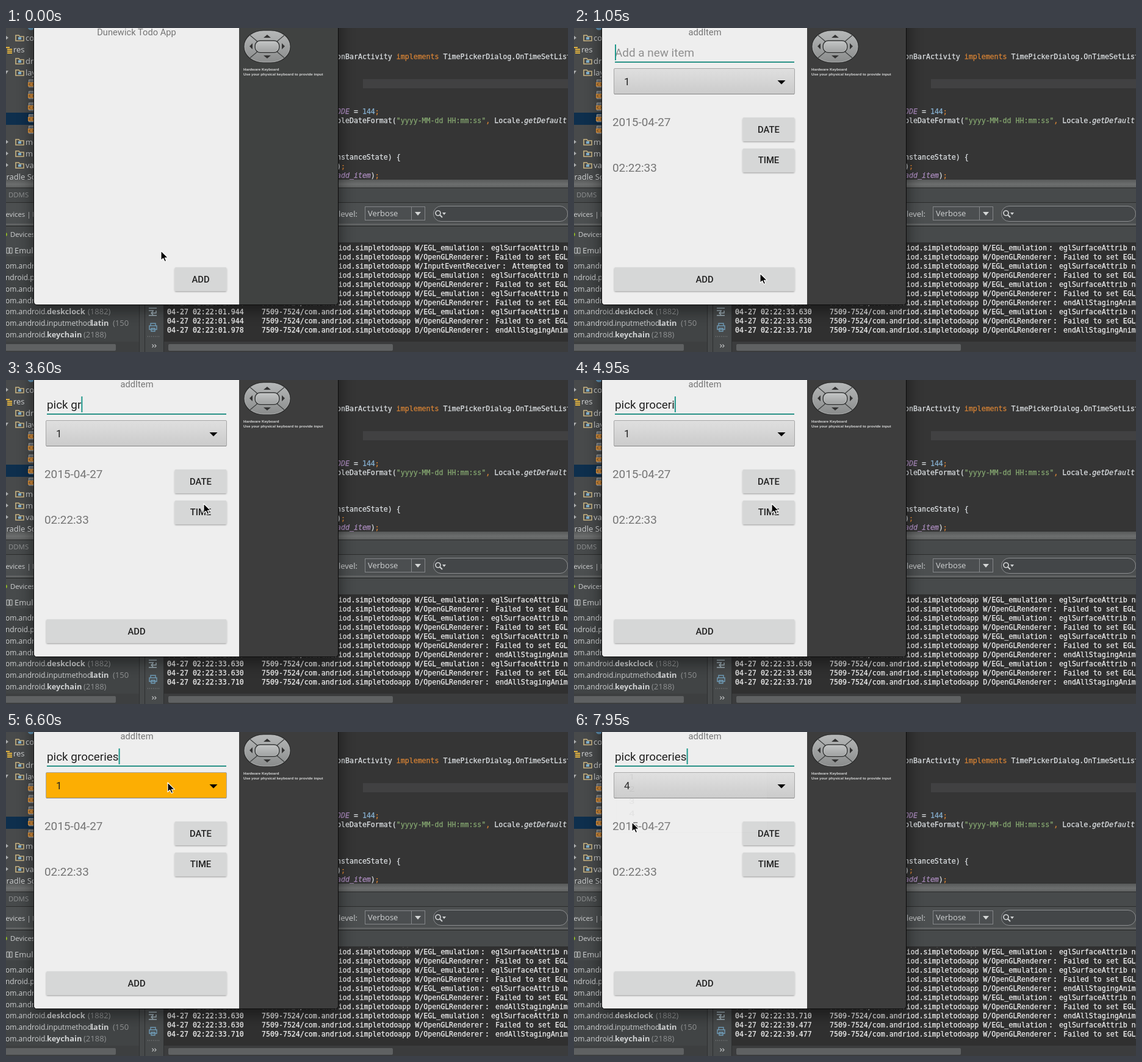
Animation, 921 px wide and 532 px high, one loop 8 s. Source, as an HTML page:

```html
<!DOCTYPE html>
<html lang="en">
<head>
<meta charset="utf-8">
<title>Todo app demo</title>
<style>
html, body { margin: 0; width: 100%; height: 100%; overflow: hidden; background: #323232; }
svg { display: block; width: 100vw; height: 100vh; }
text { white-space: pre; }
.ui { font: 13px "Open Sans", "Noto Sans", sans-serif; fill: #d0d2d3; }
.mono { font: 11.6px "DejaVu Sans Mono", monospace; fill: #dfe3e6; stroke: #dfe3e6; stroke-width: .25; }
.app { font: 18.9px Roboto, sans-serif; fill: #757575; }
.bar { font-size: 14.7px; text-anchor: middle; }
.btn { font-size: 14.8px; font-weight: 500; fill: #222; text-anchor: middle; }
.key { fill: #d98435; stroke: #d98435; }
.num { fill: #86b0d0; stroke: #86b0d0; }
.str { fill: #86a871; stroke: #86a871; }
.field { fill: #ad8dc0; stroke: #ad8dc0; font-style: italic; }
.dim { fill: #909293; }
.small { font-size: 11.4px; }
</style>
</head>
<body>
<svg viewBox="0 0 921 532" preserveAspectRatio="none">
  <defs>
    <filter id="blur" x="-20%" y="-20%" width="140%" height="140%"><feGaussianBlur stdDeviation="13"/></filter>
    <filter id="drop" x="-10%" y="-20%" width="120%" height="150%">
      <feDropShadow dx="0" dy="1.2" stdDeviation="1" flood-opacity=".32"/>
    </filter>
    <filter id="lift" x="-10%" y="-20%" width="120%" height="160%">
      <feDropShadow dx="0" dy="2.5" stdDeviation="2" flood-opacity=".4"/>
    </filter>
    <linearGradient id="spin" x2="0" y2="1"><stop stop-color="#dfdfdf"/><stop offset="1" stop-color="#cbcbcb"/></linearGradient>
    <linearGradient id="pad" x2="0" y2="1"><stop stop-color="#b6b8b8"/><stop offset="1" stop-color="#8a8c8c"/></linearGradient>
    <linearGradient id="knob" x2="0" y2="1"><stop stop-color="#c2c4c4"/><stop offset="1" stop-color="#a0a2a2"/></linearGradient>
    <linearGradient id="split" x2="0" y2="1"><stop stop-color="#585a5a"/><stop offset=".6" stop-color="#6c6e6e"/><stop offset="1" stop-color="#5e6060"/></linearGradient>
    <clipPath id="logClip"><rect x="259" y="353" width="662" height="150"/></clipPath>
    <clipPath id="win"><path d="M46 0H544V449Q544 454 539 454H51Q46 454 46 449Z"/></clipPath>
    <clipPath id="phone"><rect x="46" width="336" height="454"/></clipPath>
  </defs>

  <!-- editor -->
  <rect width="921" height="532" fill="#353535"/>
  <rect x="585" y="84" width="336" height="15" fill="#414142"/>
  <g class="mono">
    <text x="542" y="51">onBarActivity <tspan class="key">implements</tspan> TimePickerDialog.OnTimeSetListener</text>
    <text x="542" y="141"><tspan class="field">ODE</tspan> = <tspan class="num">144</tspan><tspan class="key">;</tspan></text>
    <text x="542" y="156">bleDateFormat(<tspan class="str">"yyyy-MM-dd HH:mm:ss"</tspan><tspan class="key">,</tspan> Locale.<tspan font-style="italic">getDefault</tspan></text>
    <text x="542" y="216">nstanceState) {</text>
    <text x="542" y="231">)<tspan class="key">;</tspan></text>
    <text x="542" y="246"><tspan class="field">add_item</tspan>)<tspan class="key">;</tspan></text>
  </g>

  <!-- project tree -->
  <rect width="300" height="262" fill="#484a4b"/>
  <rect y="139" width="300" height="20" fill="#0e2f4d"/>
  <g id="tree" class="ui"></g>

  <!-- tool window -->
  <rect y="249" width="921" height="13" fill="url(#split)"/>
  <rect y="262" width="921" height="270" fill="#474a4b"/>
  <rect y="287" width="921" height="35" fill="#4c4f50"/>
  <path d="M0 262.5H921M0 286.5H921M0 325.5H921" stroke="#2b2c2c"/>
  <path d="M0 322.5H921" stroke="#6a6c6c" stroke-width="2"/>
  <g class="ui">
    <text x="4" y="278" class="small dim">DDMS</text>
    <text x="-9" y="310" class="small">Devices | logcat</text>
    <circle cx="-1" cy="339" r="3" fill="#8cb527"/>
    <text x="7" y="343" class="small">Devices</text>
    <path d="M1 361h4v9h-4zM6 361h4v9h-4z" fill="none" stroke="#c9cbcc"/>
    <text x="14" y="370">Emulator</text>
    <text x="545" y="310">level:</text>
    <rect x="588.5" y="293.5" width="98" height="22" fill="#4b4e50" stroke="#85878a"/>
    <path d="M664.500 294V316" stroke="#85878a"/>
    <text x="593" y="309">Verbose</text>
    <path d="M670 302h10l-5 6z" fill="#d4d6d6"/>
    <rect x="700.500" y="292.500" width="220" height="25" rx="12.500" fill="#434648" stroke="#8b8d8f"/>
    <circle cx="708" cy="304" r="4" fill="none" stroke="#d0d2d3" stroke-width="1.700"/>
    <path d="M711 307l4 4" stroke="#d0d2d3" stroke-width="2"/>
    <path d="M715 303h6l-3 4z" fill="#d0d2d3"/>
  </g>
  <rect y="375" width="218" height="142" fill="#414445"/>
  <rect x="259" y="352" width="662" height="180" fill="#303030"/>
  <g id="list" class="ui"></g>
  <path d="M218.500 327V532M227.500 352V532M258.500 352V532" stroke="#2e2f30"/>
  <rect y="515" width="218" height="17" fill="#3d3f40"/>
  <rect x="259" y="515" width="662" height="17" fill="#3b3c3d"/>
  <rect x="-8" y="519" width="188" height="11" rx="2" fill="#5f6162"/>
  <rect x="266" y="519" width="368" height="11" rx="2" fill="#5f6162"/>
  <g fill="none" stroke="#a3b4bd" stroke-width="1.400">
    <path d="M234 460h13M234 464h8M234 472h13M246 464v4h-8m3-3l-3 3 3 3"/>
    <path d="M237 489v-4h8v4M235 489h12v6h-12zM238 493h6v5h-6z" stroke="#6f9ab5"/>
    <path d="M239.500 519.500l2.500 2.500-2.500 2.500M243.500 519.500l2.500 2.500-2.500 2.500" stroke="#c0c2c3" stroke-width="1.100"/>
    <path d="M232 506.500h19" stroke="#7a7c7d" stroke-dasharray="1 2"/>
  </g>
  <g clip-path="url(#logClip)"><g id="log" class="mono" style="fill:#efefef;stroke:#efefef"></g></g>

  <!-- emulator window -->
  <rect x="44" y="-40" width="502" height="503" rx="8" opacity=".48" filter="url(#blur)"/>
  <path d="M45.500 0V449Q45.500 454.500 51 454.500H539Q544.500 454.500 544.500 449V0" fill="none" stroke="#0c0c0c"/>
  <g clip-path="url(#win)">
    <rect id="side" x="382" width="164" height="454"/>
    <rect x="46" width="336" height="454" fill="#eee"/>
    <rect x="389.500" y="3.500" width="77" height="54" rx="32" ry="26" fill="#2b2c2c"/>
    <rect x="391" y="5" width="74" height="51" rx="31" ry="25" fill="url(#pad)" stroke="#c4c6c6" stroke-width=".8"/>
    <path d="M400 12L413 23M456 12L443 23M400 49L413 38M456 49L443 38" stroke="#3c3e3e" stroke-width="1.200"/>
    <rect x="407.500" y="20" width="41" height="21" rx="9" fill="#3a3c3c"/>
    <rect x="409.500" y="22" width="37" height="17" rx="7" fill="url(#knob)" stroke="#d2d4d4" stroke-width=".8"/>
    <path d="M422 16h12l-6-5zM422 45h12l-6 5zM404 25v10l-5-5zM452 25v10l5-5z" fill="#333"/>
    <g font-family="'Liberation Sans', Arial, sans-serif" font-weight="700" font-size="6.200" fill="#d6d7d7">
      <text x="389" y="70">Hardware Keyboard</text>
      <text x="389" y="77.500">Use your physical keyboard to provide input</text>
    </g>
    <g clip-path="url(#phone)" class="app">
      <g id="home">
        <text x="214" y="12" class="bar">Dunewick Todo App</text>
        <rect id="addBtn" x="276.500" y="393" width="85" height="39" rx="2"/>
        <text x="319" y="417.500" class="btn">ADD</text>
      </g>
      <g id="form">
        <rect x="46" y="-20" width="336" height="500" fill="#eee"/>
        <text x="214.500" y="12" class="bar">addItem</text>
        <text id="hint" x="67" y="47" fill="#8f8f8f">Add a new item</text>
        <text id="entry" x="67" y="47" fill="#212121"></text>
        <rect x="67" y="55" width="294" height="2" fill="#2a9287"/>
        <rect id="caret" y="27" width="2" height="26" fill="#1f978b"/>
        <rect id="spinner" x="65.500" y="66.500" width="296" height="42" rx="1.500" stroke="#a6a6a6"/>
        <path d="M66 108.500H361" stroke="#858585"/>
        <text id="choice" x="82" y="94" fill="#222" font-size="17">1</text>
        <path d="M333.500 86h13l-6.500 6.500z" fill="#000"/>
        <text x="63" y="161">2015-04-27</text>
        <text x="63" y="236">02:22:33</text>
        <g fill="#d6d7d7" filter="url(#drop)">
          <rect x="276.500" y="147" width="85" height="39" rx="2"/>
          <rect x="276.500" y="198" width="85" height="39" rx="2"/>
          <rect x="66" y="393" width="295.500" height="39" rx="2"/>
        </g>
        <text x="319" y="172" class="btn">DATE</text>
        <text x="319" y="222" class="btn">TIME</text>
        <text x="214" y="417.500" class="btn">ADD</text>
        <g id="popup">
          <rect x="70" y="63" width="246" height="126" rx="2" fill="#f4f4f4" filter="url(#drop)"/>
          <g id="options" font-size="17" fill="#222"></g>
        </g>
      </g>
    </g>
  </g>
  <path id="cursor" d="M0 0V15.500L3.600 12.200 6.100 17.600 8.700 16.500 6.300 11.200H11.200Z" fill="#000" stroke="#fff" stroke-width="1.100" stroke-linejoin="round"/>
</svg>
<script>
const $ = id => document.getElementById(id);
const text = (x, y, s, extra = '') => `<text x="${x}" y="${y}" ${extra}>${s}</text>`;

// Project tree
const folder = (x, y) => `<path d="M${x} ${y + 5}v-9h5l1.500 2h6.500v7z" fill="none" stroke="#c9b583" stroke-width="1.600"/>
  <rect x="${x + 4}" y="${y - 1}" width="5" height="4" fill="#7fb0cc"/>`;
const arrow = y => `<path d="M-2 ${y - 5}l6 5-6 5z" fill="#a9abac"/>`;
const file = y => `<path d="M37.500 ${y - 6}h9v12h-9z" fill="#6b7074" stroke="#a9adb0"/>
  <path d="M36 ${y - 2}h10v7h-10z" fill="#d8913f"/>
  <path d="M40 ${y - 0.500}l-2 2 2 2M43 ${y - 0.500}l2 2-2 2" fill="none" stroke="#4a3014"/>`;
const folders = [['com', 16], ['drawable', 54], ['layout', 73], ['menu', 187], ['mipmap', 206], ['values', 225]];
$('tree').innerHTML = '<circle cx="41" cy="-2" r="5.500" fill="#5f93b5"/>' +
  folders.map(([s, y]) => folder(16, y) + text(32, y + 5, s)).join('') +
  [16, 187, 206, 225].map(arrow).join('') + '<path d="M-4 70h8l-4 6z" fill="#a9abac"/>' +
  [0, 1, 2, 3, 4].map(i => file(91 + 19 * i)).join('') +
  '<path d="M0 32h6M2 35h8M2 38h8M2 41h8" stroke="#e2b33f" stroke-width="2"/>' +
  text(12, 40, 'res') + text(-9, 249, 'Gradle Scripts');

// Process list
const plain = 'style="font-size:12px"', bold = 'style="font-weight:700;font-size:12.800px"';
const process = (name, pid, y, at, pidAt) => text(-1, y, 'om.android.', plain) +
  text(at, y, name, bold) + text(pidAt, y, pid, 'class="dim"');
$('list').innerHTML = [395, 433, 452].map(y => process('', '', y, 67, 67)).join('') +
  text(-1, 414, 'ndroid.process', plain) +
  process('deskclock', '(1882)', 470, 67, 134) +
  text(67, 489, 'inputmethod.', plain) + process('latin', '(150', 489, 139, 175) +
  process('keychain', '(2188)', 508, 67, 127);

// Log: one running list, seen through a ten row view
const kinds = {
  E: ['W/EGL_emulation', 'eglSurfaceAttrib not implemented'],
  F: ['W/OpenGLRenderer', 'Failed to set EGL_SWAP_BEHAVIOR'],
  I: ['W/InputEventReceiver', 'Attempted to finish an input event'],
  D: ['D/OpenGLRenderer', 'endAllStagingAnimators']
};
const stamp = i => i < 9 ? '01.944' : i < 10 ? '01.978' : i < 12 ? '33.630' : i < 13 ? '33.710' : '39.477';
$('log').innerHTML = [...'FEFIEFEFEFDEFDEF'].map((k, n) => {
  const y = 350 + 15 * n, [tag, msg] = kinds[k];
  return text(264, y, '04-27 02:22:' + stamp(n - 1)) +
    text(419, y, `7509-7524/com.andriod.simpletodoapp ${tag}<tspan dx="3">:</tspan><tspan dx="3"> ${msg}</tspan>`);
}).join('');

$('options').innerHTML = [1, 2, 3, 4, 5].map(n => text(90, 56 + 25 * n, n)).join('');

// Pointer stops: time, x, y
const stops = [[0, 254, 366], [600, 305, 403], [1050, 305, 403], [1650, 324, 203],
  [5700, 324, 203], [6300, 265, 83], [6750, 265, 83], [7500, 96, 149], [7650, 95, 148], [8000, 95, 148]];
// Typing: time, letters shown
const typing = [[2400, 1], [2550, 2], [2700, 3], [2850, 4], [3150, 5], [3600, 7], [3900, 8],
  [4350, 9], [4650, 10], [4800, 11], [4950, 12], [5100, 13], [5400, 14]];
const phrase = 'pick groceries';
const within = (t, a, b) => t >= a && t < b;
const show = (id, on) => $(id).setAttribute('opacity', +on);

function pointer(t) {
  const i = stops.findIndex(s => s[0] > t);
  const [t0, x0, y0] = stops[i - 1], [t1, x1, y1] = stops[i];
  const p = (t - t0) / (t1 - t0), e = p * p * (3 - 2 * p);
  return [x0 + (x1 - x0) * e, y0 + (y1 - y0) * e];
}

function draw(time) {
  const t = Math.floor(time / 150) * 150;
  $('cursor').setAttribute('transform', `translate(${pointer(t).map(Math.round)})`);

  const pressed = within(t, 750, 1050);
  $('addBtn').setAttribute('fill', pressed ? '#babcbc' : '#d6d7d7');
  $('addBtn').setAttribute('filter', pressed ? 'url(#lift)' : 'url(#drop)');

  const sliding = t === 900;
  show('form', t < 900 ? 0 : sliding ? 0.5 : 1);
  $('form').setAttribute('transform', `translate(0 ${sliding ? 12 : 0})`);
  $('side').setAttribute('fill', t < 1050 ? '#404241' : '#3d3d3d');
  const scroll = t < 1050 ? 0 : t < 6900 ? 3 : 5;
  $('log').setAttribute('transform', `translate(0 ${-15 * scroll})`);

  const count = typing.reduce((n, [at, len]) => t >= at ? len : n, 0);
  $('entry').textContent = phrase.slice(0, count).replace(/ $/, '\u00a0');
  show('hint', !count);
  $('caret').setAttribute('x', count ? 67 + $('entry').getComputedTextLength() : 67);
  show('caret', !within(t, 1500, 1950) && !within(t, 5850, 6300));

  $('spinner').setAttribute('fill', t === 6600 ? '#fcae03' : 'url(#spin)');
  $('choice').textContent = t < 7950 ? 1 : 4;
  const closing = t >= 7950;
  show('popup', closing ? 0.05 : within(t, 6900, 7950));
  $('popup').setAttribute('transform', `translate(0 64) scale(1 ${closing ? 0.8 : 1}) translate(0 -64)`);
}

const start = performance.now();
function tick() {
  draw((performance.now() - start) % 8000);
  requestAnimationFrame(tick);
}
tick();
</script>
</body>
</html>
```
